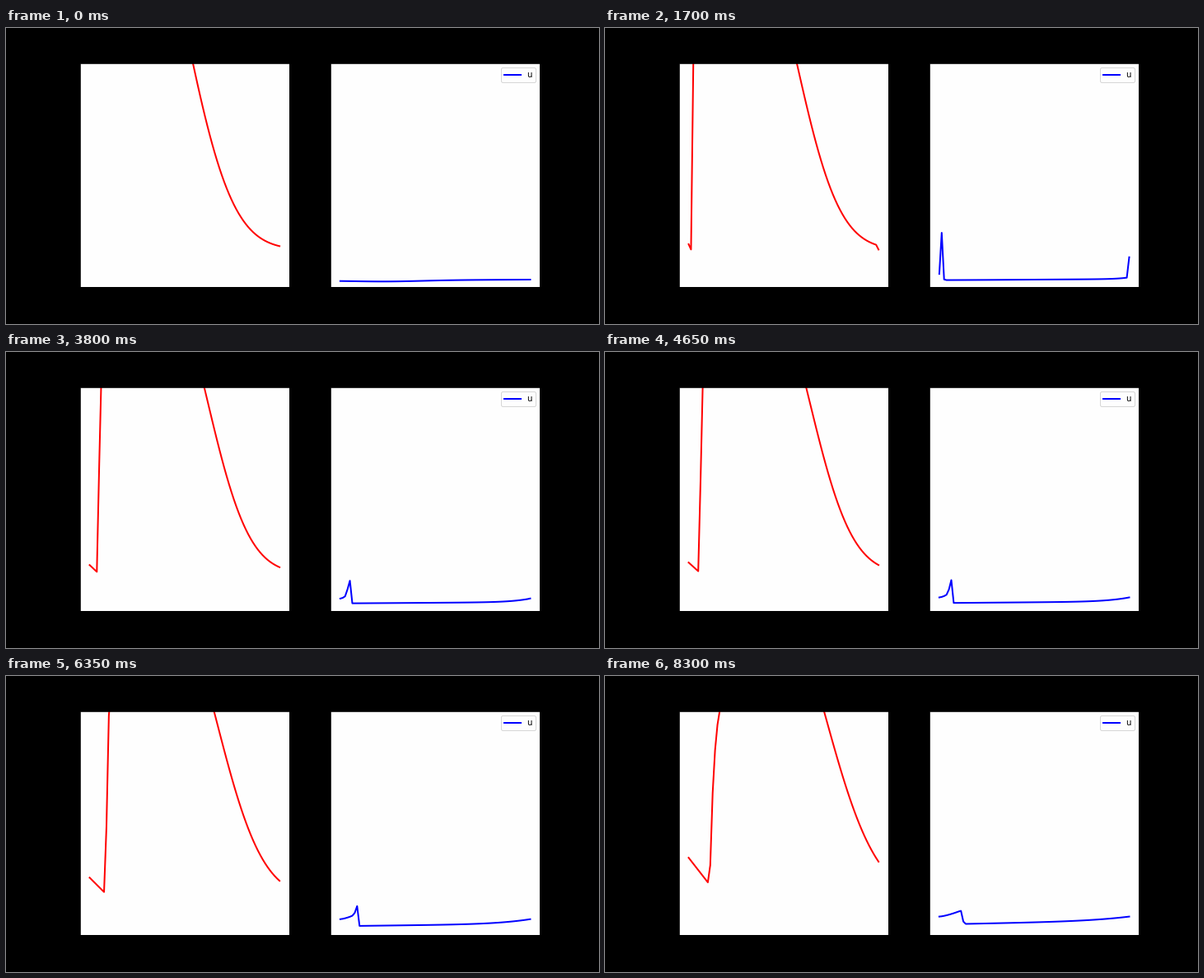
Write a matplotlib script that moves like this. It is 720 px wide and 360 px high and loops after 8350 ms.

```python
import numpy as np
import matplotlib.pyplot as plt
from matplotlib.animation import FuncAnimation

STEP, FRAMES, N = 50, 167, 80
TOP, BOTTOM = 43.2, 315.0       # axes edges; heights are stage pixels
UNIT = (BOTTOM - TOP) / 6       # one data unit
PAPER = "#fefefe"
i = np.arange(N)
x = 101.53 + 2.918 * i          # pixel positions of the cells
z = i / (N - 1)


def front_at(s):
    """Position, in cells, of the steep front moving right."""
    return -1.1 + 10.3 * s - 0.4 * s**8


def front_width(s):
    return 0.6 + 1.3 * s**9


def along_tail(s):
    return np.clip(i / max(front_at(s), 1), 0, 1)


def edge_kick(t):
    """Short burst in the last cell, t in seconds."""
    return 67 * t * np.exp(-t**2 / 1.88)


def density(s, t):
    rise = 36.5 * s**3.6

    # falling flank: a Gaussian through the top edge and the right end
    cross = 227 + s * (29 + 10 * s**3)
    end = 265.3 - 3 * s - rise
    base, top = BOTTOM - UNIT, 5 * UNIT
    lin = 0.0205 - 0.0046 * s
    span = x[-1] - cross
    quad = (np.log(top / (base - end)) - lin * span) / span**2
    d = x - cross
    flank = base - top * np.exp(-lin * d - quad * d**2)
    hump = np.where(d < -20, BOTTOM - 350 + 50 * s, flank)

    # drained tail behind the front
    left, foot = 264.5 - 7 * s - rise, 269.5 - 15.5 * s**4.5
    tail = left + (foot - left) * along_tail(s)
    ahead = np.maximum(i - front_at(s), 0)
    y = tail + (hump - tail) * (1 - np.exp(-ahead / front_width(s)))
    y[-1] += 0.2 * edge_kick(t)
    return y


def velocity(s, t):
    # slow body with an upturn that spreads from the right end
    base = 307.2 - 3 * s - 2 * s**4
    slope = 1.2 + 3.8 * s**3
    end = 306 - 13.4 * s
    body = base - slope * z
    body -= (base - slope - end) * z ** (5 + 18 * (1 - s) ** 2)
    body += 1.4 * (1 - s) ** 12 * np.exp(-0.5 * ((z - 0.25) / 0.18) ** 2)

    # faster tail with a spike riding on the front
    tail = end - (3 + 4 * s) * along_tail(s) ** 1.4
    a = front_at(s) - i
    peak = np.where(a > 0, np.exp(-a.clip(0) / 0.4), (1 + a / 0.75).clip(0))
    mix = np.clip((a + 0.95 + 0.2 * front_width(s)) / 0.7, 0, 1)
    y = body + (tail - body) * mix - 65 * (1 - s) * peak
    y[-1] -= edge_kick(t)
    return y


fig, axes = plt.subplots(1, 2, figsize=(10, 5), dpi=72, facecolor="black")
fig.subplots_adjust(left=0.125, right=0.9, bottom=0.125, top=0.88, wspace=0.2)
for ax in axes:
    ax.set(xlim=(-3.95, 82.95), ylim=(BOTTOM, TOP), xticks=[], yticks=[],
           facecolor=PAPER)
red, = axes[0].plot(i, i, color="red", lw=2)
blue, = axes[1].plot(i, i, color="blue", lw=2, label="u")
axes[1].legend(loc="upper right", fontsize=10)


def update(n):
    s, t = n / (FRAMES - 1), n * STEP / 1000
    red.set_ydata(density(s, t))
    blue.set_ydata(velocity(s, t))
    return red, blue


anim = FuncAnimation(fig, update, frames=FRAMES, interval=STEP,
                     repeat=True, repeat_delay=0)
plt.show()
```
